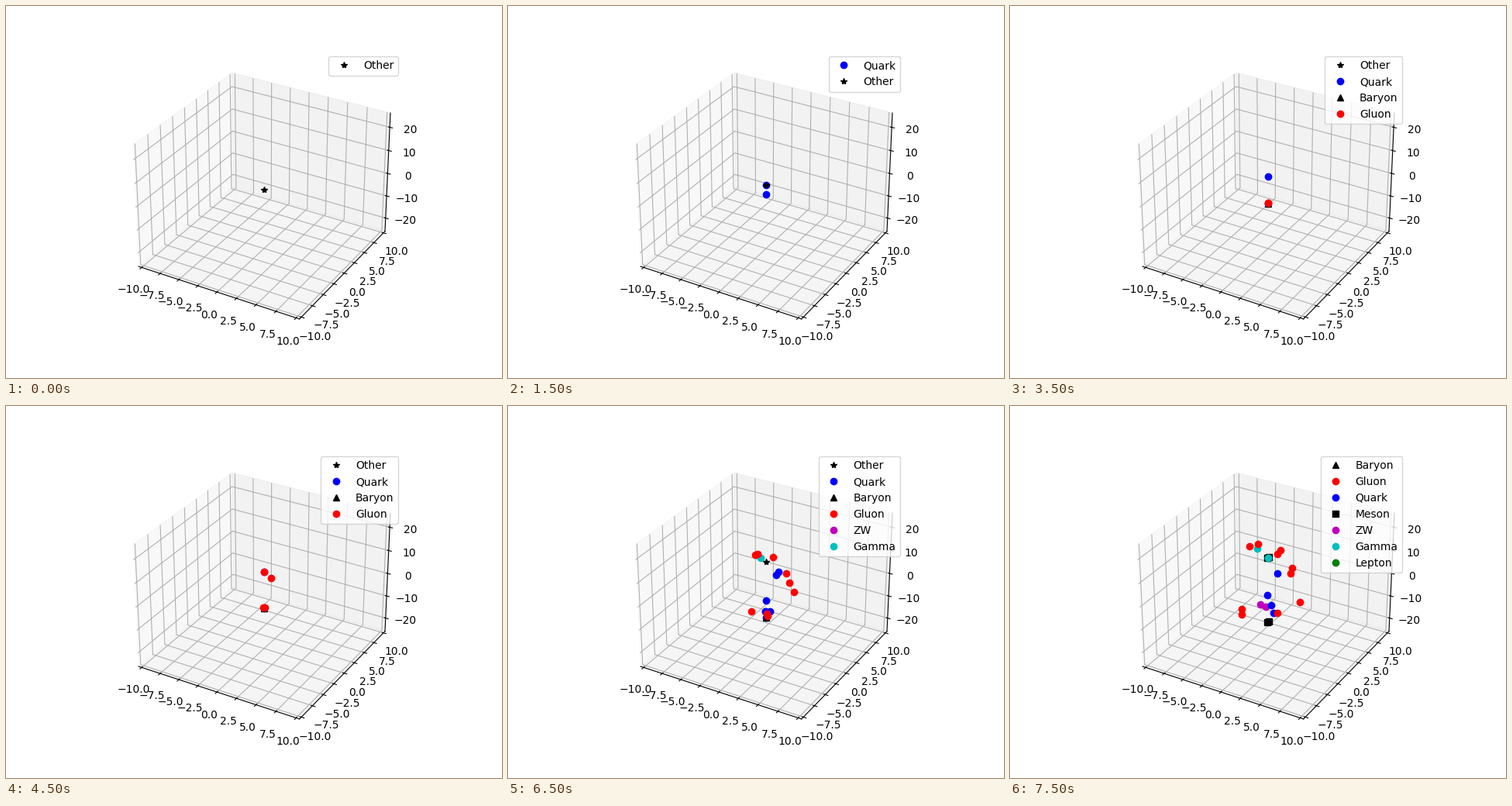
A matplotlib script for the animation above (8000 ms loop, 640 by 480 pixels).

```python
import numpy as np
import matplotlib.pyplot as plt
from matplotlib.animation import FuncAnimation

FRAMES, INTERVAL = 16, 500
LAST = FRAMES - 1
RIGHT = np.array([np.cos(np.pi / 6), np.sin(np.pi / 6)])  # screen-right in x, y

STYLE = {
    "Other": "k*", "Quark": "bo", "Baryon": "k^", "Gluon": "ro",
    "Meson": "ks", "ZW": "mo", "Gamma": "co", "Lepton": "go",
}

particles = []  # in drawing order; the legend follows first appearance


class Particle:
    """Moves in the (sideways, up) plane that faces the camera."""

    def __init__(self, kind, first, last, origin, born, v, bend=(0, 0)):
        self.kind, self.first, self.last, self.born = kind, first, last, born
        self.origin, self.v, self.bend = map(np.array, (origin, v, bend))
        particles.append(self)

    def at(self, t):
        dt = t - self.born
        return self.origin + self.v * dt + self.bend * dt**2 / 2

    def emit(self, kind, born, v, last=LAST, bend=(0, 0)):
        """Leave a new particle here; it shows from the next step on."""
        return Particle(kind, born + 1, last, self.at(born), born, v, bend)


def beam(kind, first, last, direction):
    return Particle(kind, first, last, (0, 0), 1, (0, direction))


# Collision and the two beams
beam("Other", 0, 0, 0)
beam("Baryon", 1, 1, 0)
for direction in (1, -1):
    beam("Quark", 2, 3, direction)
up = beam("Other", 2, 13, 1)
beam("Quark", 4, 9, 1)
beam("Quark", 7, 13, -1)
down = beam("Baryon", 4, LAST, -1)

# Lower jet, thrown to the left
stem = down.emit("Gluon", 3, (-0.01, -0.93), last=11)
left = stem.emit("Gluon", 11, (-0.78, 0.03), last=13)
for rise in (0.51, -0.69):
    left.emit("Gluon", 13, (-0.7, rise))

# Upper jet, arcing to the right
core = up.emit("Gluon", 7, (0, 1), last=9)
arc = up.emit("Gluon", 7, (0.41, -0.465), last=9)
arc = arc.emit("Gluon", 9, (0.805, -0.975), bend=(-0.115, -0.25))
arc.emit("Gluon", 10, (0.22, 1.12))
arc.emit("Gluon", 12, (-0.06, 2.07))
quark = arc.emit("Quark", 9, (0.16, 0.33), bend=(-0.043, 0))
quark.emit("Quark", 11, (0.15, 1.05), last=13)

# Lower vertex
rising = stem.emit("Quark", 11, (0.05, 2.45), last=13)
rising.emit("Quark", 13, (-0.04, 1.12))
for drift in (-0.03, 0.03):
    up.emit("Meson", 13, (drift, 1 + 2 * drift))
    down.emit("Meson", 13, (drift, -1 + 2 * drift))
boson = stem.emit("ZW", 11, (0, 0.06), last=13)
boson.emit("ZW", 13, (-0.07, 0.99))
boson.emit("ZW", 13, (-0.38, 1.5))
partner = stem.emit("Quark", 11, (0, 0.06), last=13)
partner.emit("Quark", 13, (0.23, 1.33))
stem.emit("Quark", 9, (0.12, -0.41))
down.emit("Gluon", 10, (0.03, -0.45), last=13)
side = stem.emit("Gluon", 6, (0.032, -0.95), last=13)
side.emit("Gluon", 13, (0.447, 0.69))

# Upper vertex
photon = up.emit("Gamma", 10, (0, 1), last=11)
photon.emit("Gamma", 11, (-0.3, 1.92))
core = core.emit("Gluon", 9, (0, 1.9), last=10)
fan_left = core.emit("Gluon", 10, (-0.416, 1.77))
fan_left.emit("Gluon", 12, (-0.09, 2.08))
fan_right = core.emit("Gluon", 10, (0.27, 1.43))
fan_right.emit("Gluon", 13, (0.133, 0.62))
for kind in ("Lepton", "Gamma"):
    up.emit(kind, 14, (0.02, 0.8))


fig = plt.figure(figsize=(6.4, 4.8), dpi=100)
ax = fig.add_subplot(projection="3d")
margin = 25 / 24
ax.set_xlim(-10 * margin, 10 * margin)
ax.set_ylim(-10 * margin, 10 * margin)
ax.set_zlim(-25 * margin, 25 * margin)


def update(i):
    for line in list(ax.lines):
        line.remove()
    handles = {}
    for p in particles:
        if p.first <= i <= p.last:
            across, z = p.at(i)
            x, y = RIGHT * across
            line, = ax.plot([x], [y], [z], STYLE[p.kind])
            handles.setdefault(p.kind, line)
    ax.legend(handles.values(), handles.keys(), loc="upper right")
    return ax.lines


anim = FuncAnimation(fig, update, frames=FRAMES, interval=INTERVAL,
                     repeat=True, repeat_delay=0, blit=False)
plt.show()
```
